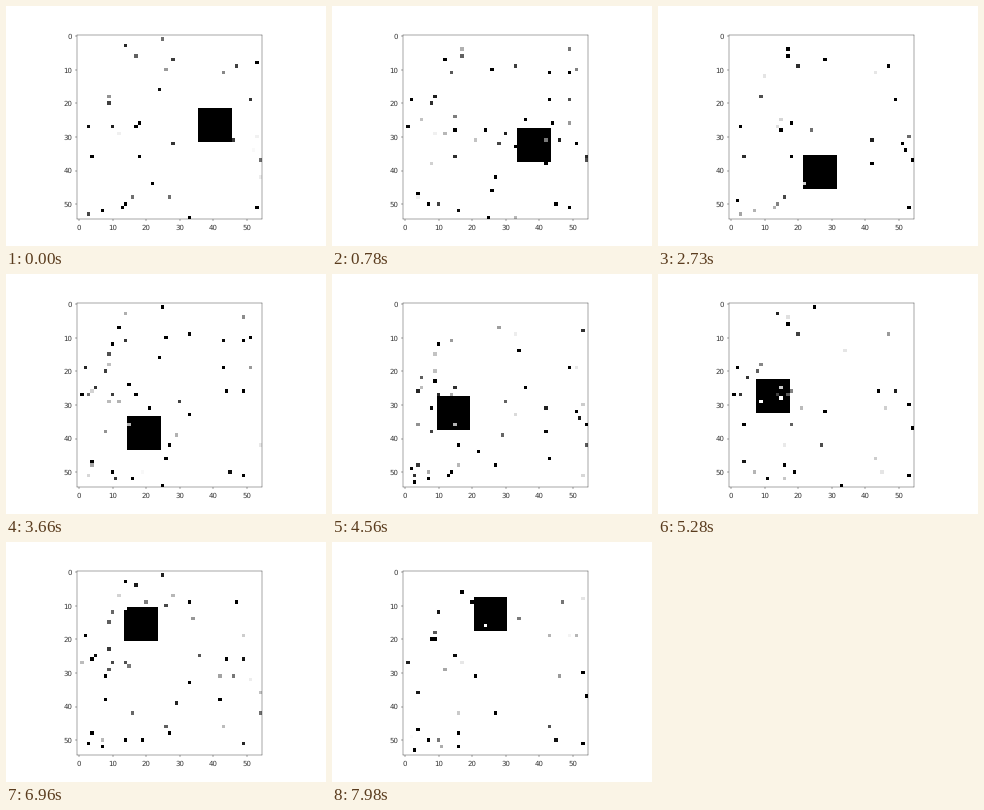
These frames come from a looping animation (320 px wide and 240 px high, 8000 ms). A matplotlib script:

```python
import numpy as np
import matplotlib.pyplot as plt
from matplotlib.animation import FuncAnimation

SIZE = 55            # cells per side
BOX = 10             # side of the moving square
BLINKERS = 90
LOOP, TICK, STEP = 8000, 20, 30   # ms
GAIN, BIAS = 1.3, -0.1            # blink wave before clipping

plt.rcParams.update({
    "text.hinting": "none",
    "axes.linewidth": 0.5,
    "xtick.major.width": 0.5,
    "ytick.major.width": 0.5,
    "xtick.labelcolor": "0.2",
    "ytick.labelcolor": "0.2",
})

rng = np.random.default_rng(4)
spots = rng.choice(SIZE * SIZE, BLINKERS, replace=False)
rows, cols = np.divmod(spots, SIZE)
phases = rng.uniform(0, 2 * np.pi, BLINKERS)
speeds = 2 * np.pi / rng.uniform(1000, 3000, BLINKERS)


def corner(step):
    """Top-left cell of the square on its circular path."""
    angle = 2 * np.pi * step / 359
    mid, radius = SIZE / 2, SIZE / 4
    x = int(mid + radius * np.cos(angle)) - BOX // 2
    y = int(mid + radius * np.sin(angle)) - BOX // 2
    return x, y


def scene(step):
    grid = np.zeros((SIZE, SIZE))
    x, y = corner(step)
    grid[y:y + BOX, x:x + BOX] = 1
    wave = GAIN * np.sin(phases + speeds * step * STEP) + BIAS
    # blinking cells invert whatever lies under them
    grid[rows, cols] = np.abs(grid[rows, cols] - np.clip(wave, 0, 1))
    return grid


fig = plt.figure(figsize=(6.4, 4.8), dpi=50)
# left, bottom, width and height in pixels, placed so the frame snaps evenly
ax = fig.add_axes([71.3 / 320, 26.6 / 240, 184.8 / 320, 184.8 / 240])
image = ax.imshow(scene(0), cmap="binary", vmin=0, vmax=1,
                  interpolation="nearest")


def update(frame):
    image.set_data(scene((frame * TICK + TICK // 2) // STEP))
    return [image]


anim = FuncAnimation(fig, update, frames=LOOP // TICK, interval=TICK,
                     repeat=True, repeat_delay=0)
plt.show()
```
